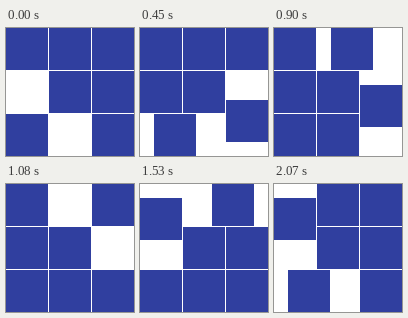
An HTML page for the animation above (2.16 s loop, 128 px wide and 128 px high).

```html
<!DOCTYPE html>
<html lang="en">
<head>
<meta charset="utf-8">
<title>Sliding squares</title>
<style>
  html, body { margin: 0; width: 100%; height: 100%; overflow: hidden; background: #fff; }
  .stage {
    position: relative; width: 128px; height: 128px; overflow: hidden;
    --b: 43px; --c: 86px;
  }
  /* Every eighth of the loop is one slide, made in three steps. */
  .stage i {
    position: absolute; left: var(--b); top: var(--b);
    width: 42px; height: 42px; background: #303f9f;
    animation: 2160ms steps(3) -1ms infinite;
  }
  .stage .tl { animation-name: tl; }
  .stage .tm { animation-name: tm; }
  .stage .tr { animation-name: tr; }
  .stage .mr { animation-name: mr; }
  .stage .br { animation-name: br; }
  .stage .bl { animation-name: bl; }

  /* Each tile ends where another one starts, so the loop is seamless. */
  @keyframes tl {
    0%, 50%     { left: 0; top: 0; }
    62.5%       { left: var(--b); top: 0; }
    75%, 100%   { left: var(--c); top: 0; }
  }
  @keyframes tm {
    0%, 37.5%   { left: var(--b); top: 0; }
    50%         { left: var(--c); top: 0; }
    62.5%, 100% { left: var(--c); top: var(--b); }
  }
  @keyframes tr {
    0%, 25%     { left: var(--c); top: 0; }
    37.5%       { left: var(--c); top: var(--b); }
    50%, 100%   { left: var(--c); top: var(--c); }
  }
  @keyframes mr {
    0%, 12.5%    { left: var(--c); top: var(--b); }
    25%          { left: var(--c); top: var(--c); }
    37.5%, 87.5% { left: var(--b); top: var(--c); }
    100%         { left: 0; top: var(--c); }
  }
  @keyframes br {
    0%         { left: var(--c); top: var(--c); }
    12.5%      { left: var(--b); top: var(--c); }
    25%, 75%   { left: 0; top: var(--c); }
    87.5%      { left: 0; top: var(--b); }
    100%       { left: 0; top: 0; }
  }
  @keyframes bl {
    0%           { left: 0; top: var(--c); }
    12.5%, 62.5% { left: 0; top: var(--b); }
    75%          { left: 0; top: 0; }
    87.5%, 100%  { left: var(--b); top: 0; }
  }
</style>
</head>
<body>
<div class="stage">
  <i></i>
  <i class="tl"></i><i class="tm"></i><i class="tr"></i>
  <i class="mr"></i><i class="br"></i><i class="bl"></i>
</div>
</body>
</html>
```
